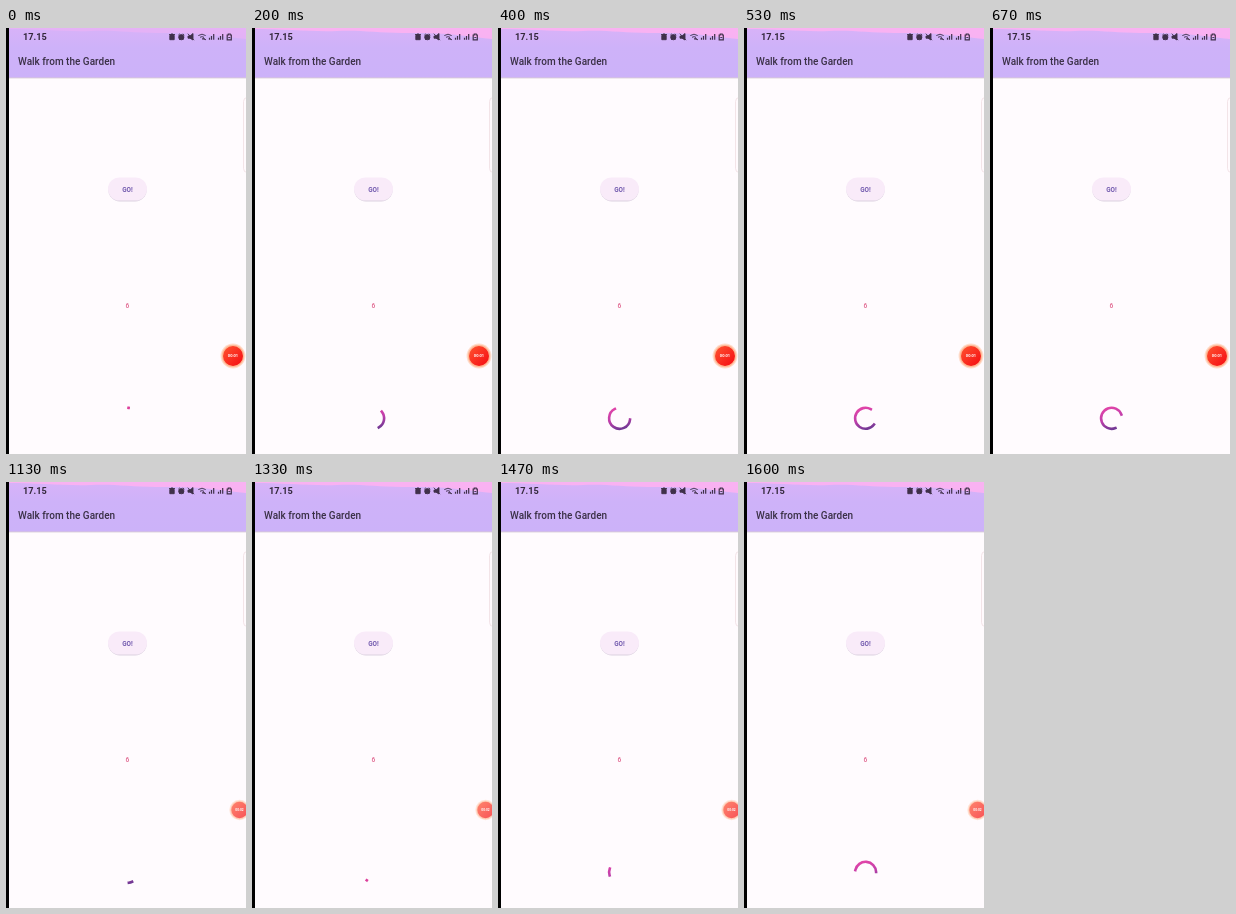
Recreate the animation shown at these times as an HTML page. Size 240 by 426 pixels, loop 1.67 s.

```html
<!DOCTYPE html>
<html lang="en">
<head>
<meta charset="utf-8">
<title>Loading screen</title>
<style>
html, body { margin: 0; width: 100%; height: 100%; overflow: hidden; background: #fffbfe; }
svg { display: block; width: 240px; height: 426px; }
text { font-family: Roboto, sans-serif; }
</style>
</head>
<body>
<svg viewBox="0 0 240 426">
  <defs>
    <linearGradient id="bar" x1="0" y1="0" x2="0" y2="1">
      <stop offset="0" stop-color="#d8b2f8"/>
      <stop offset=".4" stop-color="#ceb2f9"/>
      <stop offset="1" stop-color="#ccb2f9"/>
    </linearGradient>
    <linearGradient id="ink" gradientUnits="userSpaceOnUse" x1="118" y1="380" x2="124" y2="401">
      <stop offset="0" stop-color="#e044a8"/>
      <stop offset=".5" stop-color="#c13fab"/>
      <stop offset="1" stop-color="#713894"/>
    </linearGradient>
    <linearGradient id="red" x1="0" y1="0" x2="1" y2="1">
      <stop offset="0" stop-color="#ff5430"/>
      <stop offset="1" stop-color="#f50a12"/>
    </linearGradient>
    <filter id="soft" x="-20%" y="-40%" width="140%" height="190%">
      <feGaussianBlur stdDeviation=".6"/>
    </filter>
  </defs>

  <rect width="240" height="426" fill="#fffbfe"/>

  <rect y="49" width="240" height="1.4" fill="#d8cbd4"/>
  <rect width="240" height="49.5" fill="url(#bar)"/>
  <path id="glow" fill="#ffb3f1" d="M0 0H240V11C226 10 219 8 205 7C185 5 172 5 150 5C125 5 110 2 85 3C60 4 35 1 0 1Z"/>

  <text x="17" y="12" font-size="9.2" font-weight="700" fill="#33283c">17.15</text>
  <g fill="#40304a" stroke="#40304a" stroke-width=".9">
    <path d="M163.8 7.5Q166 4.2 168.2 7.5V11.7H163.8ZM163 6.5H169"/>
    <circle cx="175.3" cy="9.2" r="2.6"/>
    <path d="M172.3 7.2L173.8 5.8M178.3 7.2L176.8 5.8M173.2 12L174 11M177.4 12L176.6 11"/>
    <path d="M182 8H184L187 5.5V12L184 10.2H182Z"/>
    <path d="M181.8 5.7L188 12.2" fill="none"/>
    <path d="M192.3 7.6Q196 4.8 199.7 7.6M194 9.3Q196 8 198 9.3" fill="none"/>
    <path d="M196 11.2L197.5 10L200 12"/>
    <path id="signal" d="M203.5 11.7V9.8M205.5 11.7V8M207.7 11.7V6" fill="none" stroke-width="1.2"/>
    <use href="#signal" x="9"/>
    <path d="M221.2 7H222.3V6H224.2V7H225.3V11.8H221.2Z" fill="none" stroke-width="1.2"/>
    <path d="M222.3 9.5H224.3"/>
  </g>
  <text x="12" y="37" font-size="10" font-weight="500" fill="#3a3046">Walk from the Garden</text>

  <rect x="237.5" y="69.5" width="12" height="75" rx="4" fill="#fffafd" stroke="#f0dfe2" stroke-width=".8"/>

  <rect x="102.3" y="150.4" width="38.4" height="23" rx="11.5" fill="#cfc4d6" opacity=".75" filter="url(#soft)"/>
  <rect x="102" y="149.5" width="39" height="23" rx="11.5" fill="#f9ebf9"/>
  <text x="121.5" y="163.6" font-size="6.4" font-weight="700" fill="#725aae" text-anchor="middle">GO!</text>
  <text x="121.3" y="280.1" font-size="6.6" font-weight="500" fill="#e0648e" text-anchor="middle">6</text>

  <path id="arc" fill="none" stroke-width="2.6" stroke-linecap="square"/>

  <g id="bubble">
    <circle r="12.4" fill="#ffdccb"/>
    <circle r="11.2" fill="#ffb896"/>
    <circle r="10" fill="url(#red)"/>
    <text id="clock" y="1.4" font-size="4" font-weight="700" fill="#fff" text-anchor="middle">00:01</text>
  </g>

  <rect width="3" height="426" fill="#000"/>
</svg>
<script>
const LOOP = 1670, STEP = 200 / 3;
const CYCLE = 4000 / 3, SPIN = 4444;
const $ = id => document.getElementById(id);
const clamp = v => Math.max(0, Math.min(1, v));
const smooth = v => v * v * (3 - 2 * v);
const bump = (t, mid, width) => Math.exp(-(((t - mid) / width) ** 2));

// cubic-bezier(.4, 0, .2, 1)
function ease(x) {
  let lo = 0, hi = 1;
  for (let i = 0; i < 24; i++) {
    const s = (lo + hi) / 2, r = 1 - s;
    if (1.2 * s * r * r + 0.6 * s * s * r + s * s * s < x) lo = s;
    else hi = s;
  }
  return smooth(lo);
}

function point(deg) {
  const a = deg * Math.PI / 180;
  return (121.6 + 10.5 * Math.sin(a)).toFixed(2) + " " + (390.3 - 10.5 * Math.cos(a)).toFixed(2);
}

// Head and tail chase each other while the whole ring turns.
function spinner(time) {
  const t = time - 60 * bump(time, 930, 130);
  const p = (t % CYCLE) / CYCLE;
  const base = 5 + 720 * t / SPIN + 90 * p;
  const tail = base + 270 * ease(clamp(2 * p - 1));
  const sweep = Math.max(0.6, base + 270 * ease(clamp(2 * p)) - tail);
  $("arc").setAttribute("d",
    `M${point(tail)}A10.5 10.5 0 ${sweep > 180 ? 1 : 0} 1 ${point(tail + sweep)}`);
  $("arc").setAttribute("stroke", sweep < 12 ? "#dc3f9b" : "url(#ink)");
}

function bubble(t) {
  const k = smooth(clamp((t - 860) / 200));
  $("bubble").setAttribute("transform", `translate(${227 + 6.5 * k} 328) scale(${1 - 0.18 * k})`);
  $("bubble").setAttribute("opacity", 1 - 0.3 * k);
  $("clock").textContent = t < 900 ? "00:01" : "00:02";
}

function draw(t) {
  spinner(t);
  bubble(t);
  $("glow").setAttribute("opacity", 0.35 + 0.5 * clamp(t / 70));
}

const start = n => Math.round(n * STEP / 10) * 10;

// The picture advances 15 times a second.
function tick() {
  const now = performance.now() % LOOP;
  let i = Math.min(24, Math.floor(now / STEP) + 1);
  while (start(i) > now) i--;
  draw(start(i));
  requestAnimationFrame(tick);
}
tick();
</script>
</body>
</html>
```
